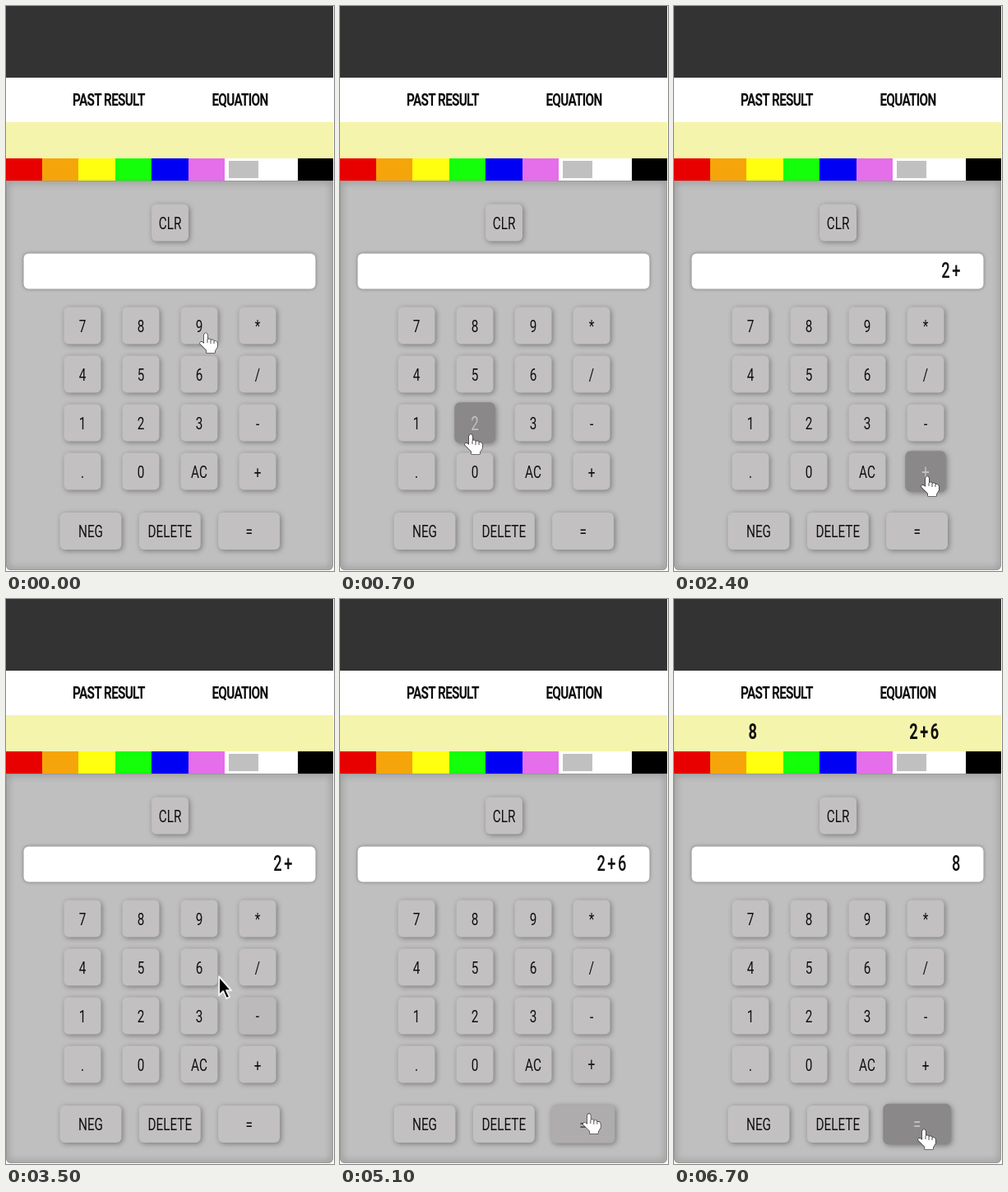
Write an HTML page with a canvas that moves like this. It is 399x686 px and loops after 8000 ms.

```html
<!DOCTYPE html>
<html lang="en">
<head>
<meta charset="utf-8">
<title>Calculator</title>
<style>
  html, body { margin: 0; width: 100%; height: 100%; overflow: hidden; background: #fff; }
  canvas { display: block; }
</style>
</head>
<body>
<canvas id="stage" width="399" height="686"></canvas>
<script>
const ctx = document.getElementById('stage').getContext('2d');
const LOOP = 8000, STEP = 100, FADE = 300, RESULT = 5700;
const CONDENSED = 0.73;
const SWATCHES = ['#e80000', '#f5a50a', '#ffff0f', '#14ff0a', '#0000f5', '#e56eea', '#fff', '#fff', '#000'];

const buttons = [
  ...['789*', '456/', '123-', '.0A+'].flatMap((row, r) => [...row].map((key, c) =>
    ({ label: key === 'A' ? 'AC' : key, x: 93 + 71 * c, y: 388 + 59 * r, w: 45 }))),
  { label: 'CLR', x: 199.5, y: 263, w: 45 },
  ...['NEG', 'DELETE', '='].map((label, i) => ({ label, x: 103 + 96.3 * i, y: 637.5, w: 75 }))
];

// Pointer stops, and the curved moves between them
const nine = { x: 243, y: 397 }, two = { x: 159, y: 520 }, plus = { x: 308, y: 571 };
const six = { x: 238, y: 452 }, equals = { x: 304, y: 644 };
const middle = (a, b) => ({ x: (a.x + b.x) / 2, y: (a.y + b.y) / 2 });
const moves = [
  { start: 100, end: 700, from: nine, bend: middle(nine, two), to: two },
  { start: 1500, end: 2250, from: two, bend: middle(two, plus), to: plus },
  { start: 3050, end: 3850, from: plus, bend: { x: 298, y: 458 }, to: six },
  { start: 4650, end: 5450, from: six, bend: { x: 308, y: 605 }, to: equals }
];

const hand = new Path2D('M-2 2Q0-2 2 2V8Q5 6 6 9Q9 7 10 10Q13 9 14 12V17L11 22V24H1V21L-7 13Q-7 9-3 12L-2 13Z');
const fingers = new Path2D('M2 8V12M6 9V13M10 10V13');
const arrow = new Path2D('M0 0V23L5 18L9 27L13 25L9 17H15Z');

const ease = x => 1 - (1 - x) ** 2;
const mix = (a, b, k) => a + (b - a) * k;
const clamp = x => Math.min(1, Math.max(0, x));

function pointer(t) {
  const { start, end, from, bend, to } = moves.findLast(m => t >= m.start) || moves[0];
  const k = ease(clamp((t - start) / (end - start)));
  const along = axis => mix(mix(from[axis], bend[axis], k), mix(bend[axis], to[axis], k), k);
  return { x: along('x'), y: along('y') };
}

function isOver(b, t) {
  const p = pointer(t);
  return t >= 0 && Math.abs(p.x - b.x) < b.w / 2 && Math.abs(p.y - b.y) < 22.5;
}

// Share of the fade window spent on the button, eased in the current direction
function hoverAmount(b, t) {
  let share = 0;
  for (let d = 0; d < FADE; d += 20) share += isOver(b, t - d - 10) * 20 / FADE;
  return isOver(b, t) ? ease(share) : 1 - ease(1 - share);
}

function rect(x, y, w, h, color) {
  ctx.fillStyle = color;
  ctx.fillRect(x, y, w, h);
}

function rounded(x, y, w, h, radius, color) {
  ctx.beginPath();
  ctx.roundRect(x, y, w, h, radius);
  ctx.fillStyle = color;
  ctx.fill();
}

function shadow(color, blur, offset = 0) {
  Object.assign(ctx, { shadowColor: color, shadowBlur: blur, shadowOffsetX: offset, shadowOffsetY: offset });
}

function text(str, x, y, { size = 21, weight = 400, color = '#111', spacing = 0, align = 'center' } = {}) {
  ctx.save();
  ctx.translate(x, y);
  ctx.scale(CONDENSED, 1);
  ctx.font = `${weight} ${size}px Roboto, sans-serif`;
  ctx.letterSpacing = spacing + 'px';
  ctx.textAlign = align;
  ctx.fillStyle = color;
  ctx.fillText(str, 0, size * 0.355);
  ctx.restore();
}

function drawHeader(done) {
  rect(0, 0, 398, 87, '#333');
  const heading = { weight: 700, spacing: -1, color: '#0c0c0c' };
  text('PAST RESULT', 125, 114, heading);
  text('EQUATION', 284.5, 114, heading);
  rect(0, 141, 398, 44, '#f5f4ac');
  if (done) {
    const entry = { size: 25, weight: 700, spacing: 3.5 };
    text('8', 97, 161, entry);
    text('2+6', 305.5, 161, entry);
  }
  SWATCHES.forEach((color, i) => rect(Math.floor(i * 44.4), 185, 45, 27, color));
  rect(271, 188, 36, 21, '#c0c0c0');
  rect(398, 0, 1, 686, '#fff');
}

function drawPanel() {
  ctx.save();
  rounded(0, 212, 398, 473, [0, 0, 6, 6], '#bfbfbf');
  ctx.clip();
  shadow('#555', 9);
  ctx.lineWidth = 2;
  ctx.strokeStyle = '#999';
  ctx.stroke();
  ctx.restore();
}

function drawInput(value) {
  ctx.save();
  shadow('rgba(0,0,0,.4)', 4);
  rounded(21.5, 300.5, 355, 43, 6, '#fff');
  ctx.restore();
  text(value, 351, 321, { size: 25, weight: 500, spacing: 3.5, align: 'right' });
}

function drawButton(b, t) {
  const k = hoverAmount(b, t), scale = mix(1, 1.1, k);
  const fill = mix(192, 136, k), ink = mix(17, 192, k);
  ctx.save();
  ctx.translate(b.x, b.y);
  ctx.scale(scale, scale);
  shadow('rgba(0,0,0,.36)', 6, 1.5);
  rounded(-b.w / 2, -22.5, b.w, 45, 6, `rgb(${fill + 2},${fill},${fill})`);
  shadow('transparent', 0);
  text(b.label, 0, 0.5, { color: `rgb(${ink},${ink},${ink})` });
  ctx.restore();
}

function drawPointer(t) {
  const { x, y } = pointer(t);
  ctx.save();
  ctx.translate(x, y);
  ctx.lineJoin = 'round';
  if (buttons.some(b => isOver(b, t))) {
    ctx.fillStyle = '#fff';
    ctx.strokeStyle = '#222';
    ctx.lineWidth = 1.2;
    ctx.stroke(hand);
    ctx.fill(hand);
    ctx.lineWidth = 0.8;
    ctx.stroke(fingers);
  } else {
    ctx.fillStyle = '#000';
    ctx.strokeStyle = '#eee';
    ctx.lineWidth = 2;
    ctx.fill(arrow);
    ctx.stroke(arrow);
  }
  ctx.restore();
}

function display(t) {
  if (t >= RESULT) return '8';
  return '2+6'.slice(0, [1100, 2400, 4100].filter(press => t >= press).length);
}

function draw() {
  const t = Math.floor(performance.now() % LOOP / STEP) * STEP;
  rect(0, 0, 399, 686, '#fff');
  drawPanel();
  drawHeader(t >= RESULT);
  drawInput(display(t));
  buttons.forEach(b => drawButton(b, t));
  drawPointer(t);
  requestAnimationFrame(draw);
}
draw();
</script>
</body>
</html>
```
